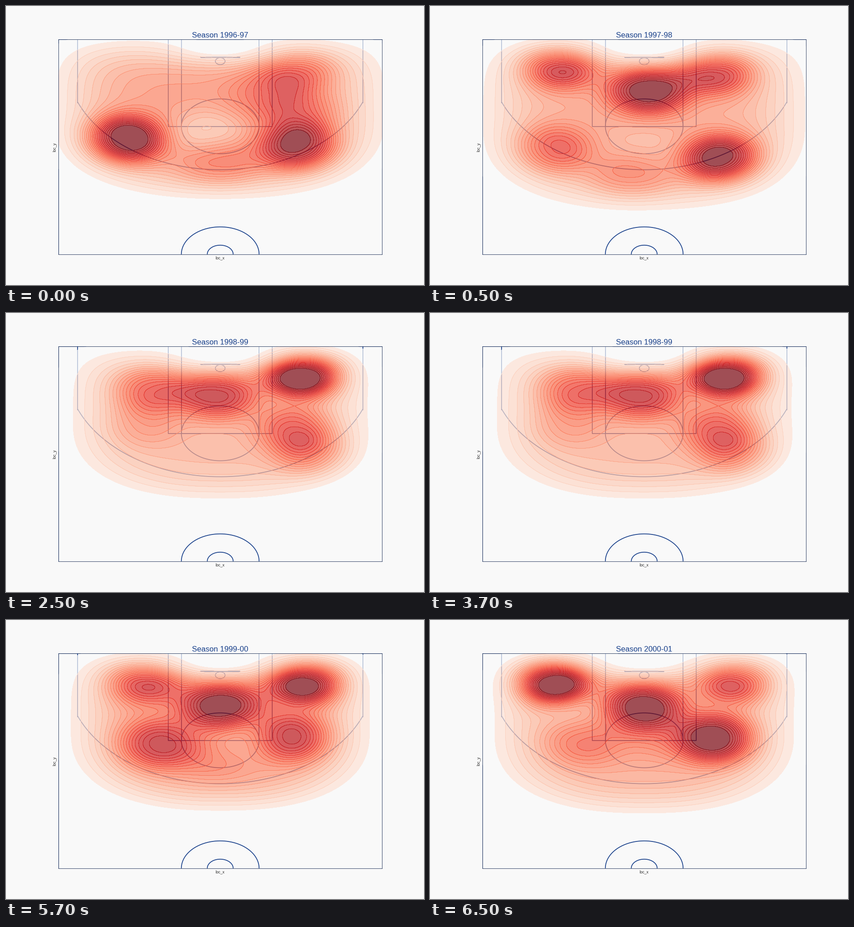
Animation of 917 by 611 pixels, one loop 8 s. Source, as a matplotlib script:

```python
import numpy as np
import matplotlib.pyplot as plt
from matplotlib.animation import FuncAnimation

W, H = 917, 611
PAPER, NAVY, INK = "#f9f9f9", "#173f8a", "#262626"
MID_X, HOOP_Y, BASELINE = 470, 121, 75
SPREAD_X, SPREAD_Y = 62, 38

plt.rcParams["font.family"] = "Liberation Sans"

# reach and depth bound the shooting area, floor is its base density,
# spots are the key points (x, y, density)
SEASONS = {
    "1996-97": dict(reach=357, depth=420, floor=.39, spots=[
        (250, 294, 1), (648, 312, .92), (570, 190, .64), (650, 235, .68),
        (640, 135, .56), (443, 278, .22), (470, 350, .50)]),
    "1997-98": dict(reach=355, depth=447, floor=.34, spots=[
        (480, 182, 1), (280, 122, .62), (630, 138, .68), (645, 338, .95),
        (262, 315, .60), (440, 377, .45), (470, 312, .30)]),
    "1998-99": dict(reach=333, depth=411, floor=.27, spots=[
        (657, 125, .95), (465, 178, .80), (320, 163, .62), (300, 240, .42),
        (637, 253, .67), (685, 312, .47)]),
    "1999-00": dict(reach=325, depth=416, floor=.39, spots=[
        (472, 186, 1), (667, 126, .86), (328, 273, .80), (632, 257, .80),
        (300, 124, .60), (525, 262, .42), (460, 300, .48)]),
    "2000-01": dict(reach=330, depth=424, floor=.34, spots=[
        (260, 124, .90), (466, 186, 1), (631, 260, 1), (680, 124, .58),
        (327, 202, .33), (335, 265, .54), (500, 248, .64)]),
}


def bump(x, y, cx, cy):
    q = ((x - cx) / SPREAD_X) ** 2 + ((y - cy) / SPREAD_Y) ** 2
    return np.exp(-(q / 2) ** 1.25)


def envelope(x, y, reach, depth):
    """Soft-edged shooting area: square at the baseline, round below, open at the hoop."""
    u = np.abs(x - MID_X) / reach
    v = (2 * y - BASELINE - depth) / (depth - BASELINE)
    n = np.where(v < 0, 5, 2.4)
    radius = (u ** n + np.abs(v) ** n) ** (1 / n)
    gap = np.exp(-((x - MID_X) / 85) ** 2 / 2 - ((y - 85) / 28) ** 2 / 2)
    return np.exp(-2 * radius ** 5) * (1 - gap)


def density(x, y, reach, depth, floor, spots):
    """Bumps on a floor, weighted so each spot has its stated density."""
    px, py, level = np.array(spots).T
    basis = bump(px[:, None], py[:, None], px, py)
    weights = np.linalg.solve(basis, level / envelope(px, py, reach, depth) - floor)
    relief = floor + sum(w * bump(x, y, cx, cy) for w, cx, cy in zip(weights, px, py))
    return relief * envelope(x, y, reach, depth)


fig, ax = plt.subplots(figsize=(W / 72, H / 72), dpi=72, facecolor=PAPER)
fig.subplots_adjust(left=.125, right=.9, bottom=.11, top=.88)
ax.set(xlim=(-250, 250), ylim=(422.5, -47.5), xticks=[], yticks=[], facecolor=PAPER)
for spine in ax.spines.values():
    spine.set(color="#1c2c50", linewidth=.8, zorder=4)


def line(xs, ys, width=1.7):
    ax.plot(xs, ys, color=NAVY, lw=width, zorder=1, solid_capstyle="butt")


def box(x, y, w, h, **kw):
    line([x, x + w, x + w, x, x], [y, y, y + h, y + h, y], **kw)


def arc(cx, cy, r, start=0, end=360):
    t = np.radians(np.linspace(start, end, 200))
    line(cx + r * np.cos(t), cy + r * np.sin(t))


def draw_court():
    box(-250, -47.5, 500, 470, width=1.2)
    box(-80, -47.5, 160, 190)
    box(-60, -47.5, 120, 190)
    box(-30, -7.5, 60, -1)
    arc(0, 0, 7.5)
    arc(0, 142.5, 60)
    for side in (-220, 220):
        line([side, side], [-47.5, 92.5])
    arc(0, 0, 237.5, 22, 158)
    arc(0, 422.5, 60, 180, 360)
    arc(0, 422.5, 20, 180, 360)


def draw_heat(season):
    cx, cy = np.meshgrid(np.linspace(-250, 250, 356), np.linspace(-47.5, 422.5, 236))
    z = density(MID_X + 1.42 * cx, HOOP_Y + cy, **season)
    levels = np.linspace(.05, .9, 22)
    reds = plt.get_cmap("Reds")
    fills = [reds(.07 + .93 * v) for v in levels[:-1]] + [reds(.96)]
    edges = [reds(min(.14 + .93 * v, 1)) for v in levels[1:]]
    # The faintest band only veils the court lines
    bands = ax.contourf(cx, cy, z, levels=[.012, *levels, 9], colors=[PAPER, *fills],
                        alpha=.7, zorder=2)
    rings = ax.contour(cx, cy, z, levels=levels[1:], colors=edges, alpha=.7,
                       linewidths=.55, zorder=3)
    return bands, rings


def label(x, y, text, size, color, **kw):
    return fig.text(x / W, 1 - y / H, text, size=size, color=color, ha="center", **kw)


draw_court()
heat = [draw_heat(season) for season in SEASONS.values()]
title = label(MID_X, 69, "", 16.8, NAVY, va="baseline")
label(MID_X, 554, "loc_x", 8.6, INK, va="baseline")
label(107, 309, "loc_y", 8.6, INK, va="center", rotation=90)


def update(frame):
    current = (frame + 3) // 4
    title.set_text("Season " + list(SEASONS)[current])
    for i, layers in enumerate(heat):
        for layer in layers:
            layer.set_visible(i == current)
    return [title]


anim = FuncAnimation(fig, update, frames=16, interval=500, repeat=True,
                     repeat_delay=0, blit=False)
plt.show()
```
